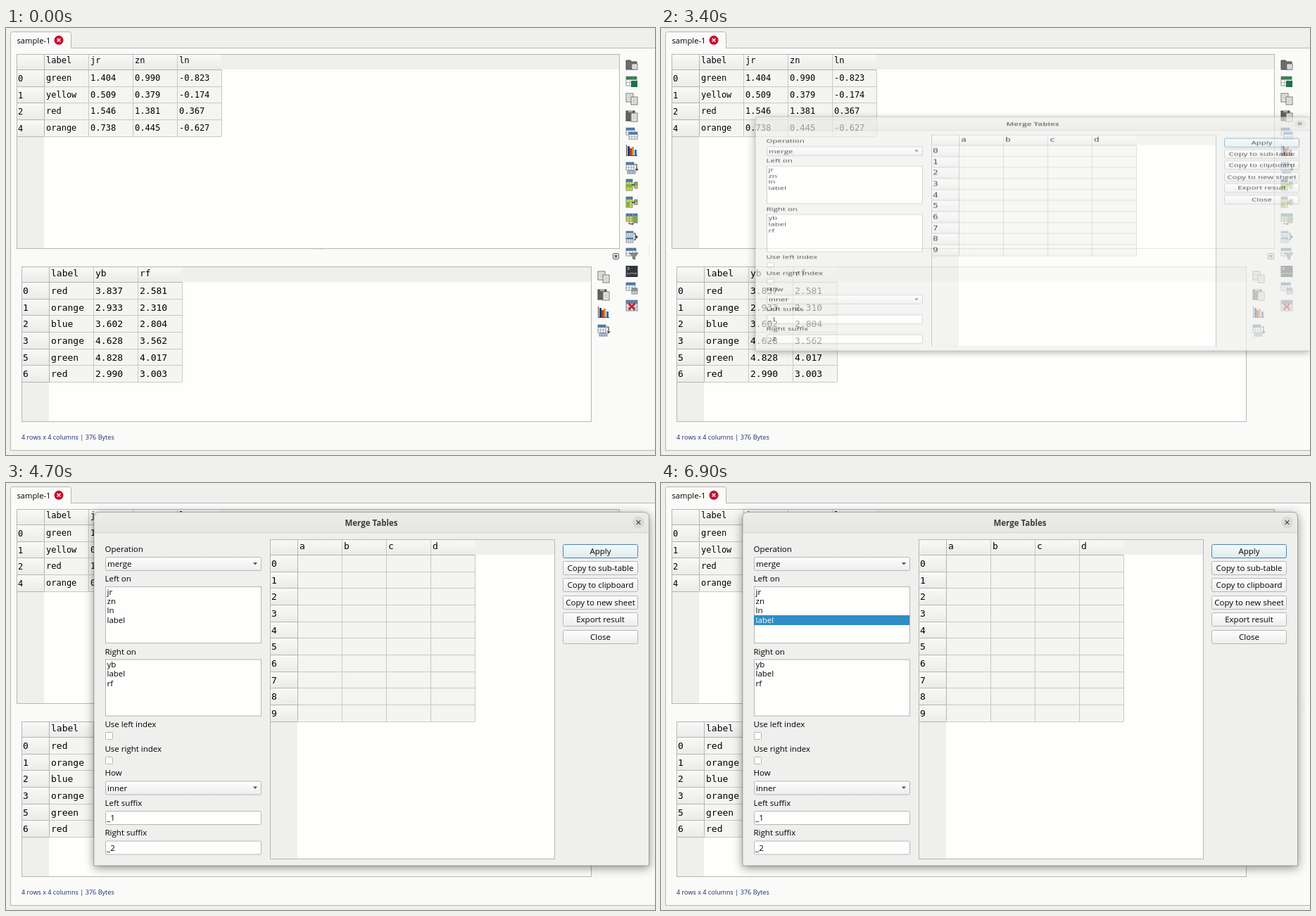
Write an HTML page that moves like this. It is 922 px wide and 607 px high and loops after 8 s.

```html
<!DOCTYPE html>
<html lang="en">
<head>
<meta charset="utf-8">
<title>Merge tables</title>
<style>
html, body { margin: 0; width: 100%; height: 100%; overflow: hidden; background: #efefee; }
svg { display: block; width: 922px; height: 607px; }
text { white-space: pre; }
.ui { font: 11.5px "Open Sans", "Noto Sans", sans-serif; }
.mono { font-family: "DejaVu Sans Mono", monospace; }
#dialog { transform-origin: 0 292.5px; }
#shade { filter: drop-shadow(0 3px 7px rgba(0, 0, 0, .45)); }
</style>
</head>
<body>
<script>
const LOOP = 8000;
const BLUE = '#2a78d0', GREEN = '#7cb82f', YELLOW = '#d8dc3c', EDGE = '#b6b6b4';

// --- drawing helpers -------------------------------------------------
const rect = (x, y, w, h, fill, extra = '') =>
  `<rect x="${x}" y="${y}" width="${w}" height="${h}" fill="${fill}" ${extra}/>`;
const box = (x, y, w, h, fill, stroke = EDGE, r = 0) =>
  rect(x + .5, y + .5, w - 1, h - 1, fill, `stroke="${stroke}" rx="${r}"`);
const path = (d, stroke, width = 1, fill = 'none') =>
  `<path d="${d}" fill="${fill}" stroke="${stroke}" stroke-width="${width}"/>`;
const ui = (x, y, s, extra = '') => `<text class="ui" x="${x}" y="${y}" ${extra}>${s}</text>`;
const mono = (x, y, s, size) => `<text class="mono" x="${x}" y="${y}" font-size="${size}">${s}</text>`;
const group = (id, body) => `<g id="${id}">${body}</g>`;
const cross = (x, y, r, color, w) =>
  path(`M${x - r} ${y - r}l${2 * r} ${2 * r}m0 ${-2 * r}l${-2 * r} ${2 * r}`, color, w);
const gradient = (id, a, b) =>
  `<linearGradient id="${id}" x2="0" y2="1"><stop stop-color="${a}"/><stop offset="1" stop-color="${b}"/></linearGradient>`;

function table(x, y, w, h, names, ids, rows, size, rowH) {
  const left = x + 39, top = y + 22, colW = 63;
  const right = left + colW * names.length, bottom = top + rowH * ids.length;
  const rowY = i => Math.round(top + rowH * i);
  let s = rect(x, y, w, h, '#fefefd') + rect(x, y, w, 22, '#efefee') + rect(x, y, 39, h, '#efefee');
  s += rect(x, y, right - x, 22, 'url(#head)');
  s += rect(left, top, right - left, bottom - top, '#f4f5f0');
  let grid = '', heads = `M${x} ${top + .5}H${right}M${left + .5} ${y}V${bottom}`;
  names.forEach((name, i) => {
    const cx = left + colW * i;
    grid += `M${cx + colW + .5} ${y + (i < names.length - 1 ? 1 : 22)}V${rowY(ids.length)}`;
    s += mono(cx + 3, y + size + 1, name, size);
  });
  ids.forEach((id, i) => {
    const ry = rowY(i), next = rowY(i + 1), base = ry + size / 2 + 10;
    s += rect(x, ry, 39, next - ry, 'url(#head)') + mono(x + 2, base + .5, id, size);
    heads += `M${x} ${next + .5}H${left}`;
    grid += `M${left} ${next + .5}H${right}`;
    (rows[i] || []).forEach((v, k) => { s += mono(left + 3 + colW * k, base, v, size); });
  });
  return s + path(grid, '#c8c9c5') + path(heads, '#b4b4b2') + box(x, y, w, h, 'none');
}

// --- toolbar icons, drawn around 0,0 ----------------------------------
function mini(x, y, w, h, head, body = '#fdfdfd', cols = 3, rows = 3) {
  let d = '';
  for (let i = 1; i < cols; i++) d += `M${x + w * i / cols} ${y}v${h}`;
  for (let i = 1; i < rows; i++) d += `M${x} ${y + h * i / rows}h${w}`;
  return rect(x, y, w, h, body) + rect(x, y, w, h / rows, head) +
    path(d, '#8b9299', .7) + rect(x, y, w, h, 'none', 'stroke="#6f767c" stroke-width=".8"');
}
const page = (x, y, w, h, fill = '#e6e6e2') =>
  rect(x, y, w, h, fill, 'stroke="#6c6c68" stroke-width=".9"') +
  path(`M${x + 2} ${y + 3}h${w - 4}m0 2.5h${4 - w}m0 2.5h${w - 4}`, '#b5b5b0', .8);
const arrow = (x, y) => path(`M${x} ${y}h5m-2 -2.5l2.5 2.5l-2.5 2.5`, '#333', 1.3);
const halves = (x, y, w, h) =>
  mini(x, y, w, h, GREEN, YELLOW, 2, 2);

const icons = {
  open: () => path('M-8 7V-6h6l2 2h7v11z', '#4d4d4a', 1, '#6d6d69') + page(0, -1, 8, 8),
  sheet: () => mini(-8, -7, 15, 13, '#2f7d45') + rect(-1, -1, 9, 9, '#1f7246'),
  copy: () => page(-8, -8, 10, 12) + page(-1, -3, 9, 11),
  paste: () => rect(-8, -7, 12, 14, '#66625b', 'stroke="#45423d"') + rect(-5, -8, 6, 3, '#aaa') + page(-1, -4, 9, 12),
  sub: () => mini(-8, -8, 12, 10, BLUE) + mini(-4, -2, 12, 10, BLUE),
  plot: () => path('M-7.5 -8V7.5H8', '#444', 1) + rect(-6, -6, 3, 13, '#1d3f73') + rect(-3, -3, 3, 10, '#b8392b') +
    rect(0, -5, 3, 12, '#d58c2a') + rect(4, -1, 3, 8, '#2a6db5'),
  transpose: () => mini(-8, -8, 11, 11, BLUE) + mini(-6, 4, 11, 4, '#a8c8ea', '#fff', 3, 1) +
    path('M4 -5h3v8m-2 -2l2 2.5l2 -2.5', '#333', 1.1),
  group: () => mini(-8, -8, 9, 16, BLUE, YELLOW, 2, 4) + rect(-8, -1, 9, 4, GREEN) + arrow(0, 0) + halves(4, -4, 4, 9),
  pivot: () => mini(-8, -8, 9, 15, BLUE, YELLOW, 2, 4) + rect(-7.5, 0, 4, 6.5, GREEN) + arrow(0, 0) + halves(4, -4, 4, 7),
  melt: () => mini(-8, -8, 9, 11, BLUE, YELLOW, 2, 3) + mini(2, -8, 6, 13, BLUE, GREEN, 2, 4) +
    path('M-4 4v2.5h6m-2 -2l2 2l-2 2', '#333', 1),
  merge: () => mini(-8, -8, 10, 7, BLUE) + mini(-8, 1, 10, 7, BLUE) +
    path('M3 -5h2v9h-2M5 0h3m-2 -2l2 2l-2 2', '#333', 1.1),
  filter: () => mini(-8, -8, 14, 11, BLUE) + path('M-3 -1H9L4.500 4V8L1.500 7V4z', '#4c4c4c', .8, '#8d8d8a'),
  python: () => rect(-8.5, -8, 17, 16, '#31363b') + path('M-6 -6l2.500 2l-2.500 2', '#fff', .9) +
    `<text class="mono" x="-7" y="4" font-size="4" fill="#d5d8da">python</text>`,
  copyTable: () => mini(-8, -8, 13, 11, BLUE) + mini(0, 0, 8, 8, '#8e9296', '#d2d4d4', 2, 2),
  clear: () => mini(-8, -8, 16, 15, '#607d9b', '#d9dde0') + cross(0, 1, 4.5, '#c01f2b', 2.8),
};
const bar = (x, y, names, step) =>
  names.map((n, i) => `<g transform="translate(${x} ${Math.round(y + i * step)})">${icons[n]()}</g>`).join('');

// --- main window ------------------------------------------------------
function mainWindow() {
  const dots = (x, y, dx, dy) => [0, 1, 2, 3, 4].map(i => rect(x + dx * i, y + dy * i, 1, 1, '#c4c4c2')).join('');
  return rect(0, 0, 922, 607, '#efefee') +
    box(6, 28, 930, 573, '#fafaf9') +
    path('M6.500 30V8.500q0 -3 3 -3H89.500q3 0 3 3V28.500', EDGE, 1, '#fafaf9') + rect(7, 27, 85, 3, '#fafaf9') +
    ui(15.5, 22, 'sample-1', 'style="font-size:11.200px"') +
    `<circle cx="75" cy="17.300" r="6.500" fill="#c8102e"/>` + cross(75, 17.3, 2.3, '#fff', 1.4) +
    table(15, 37, 857, 277, ['label', 'jr', 'zn', 'ln'], [0, 1, 2, 4], [
      ['green', '1.404', '0.990', '-0.823'], ['yellow', '0.509', '0.379', '-0.174'],
      ['red', '1.546', '1.381', '0.367'], ['orange', '0.738', '0.445', '-0.627']], 12, 23.65) +
    table(22, 339, 810, 221, ['label', 'yb', 'rf'], [0, 1, 2, 3, 5, 6], [
      ['red', '3.837', '2.581'], ['orange', '2.933', '2.310'], ['blue', '3.602', '2.804'],
      ['orange', '4.628', '3.562'], ['green', '4.828', '4.017'], ['red', '2.990', '3.003']], 13, 23.65) +
    group('focus', box(54, 59, 64, 24, '#dfe9eb', '#9bb7c4') + mono(57, 75, 'green', 12)) +
    dots(437, 314, 3, 0) + dots(913, 309, 0, 3) +
    box(862, 320, 9, 9, '#fff', '#555', 1) + cross(866.5, 324.5, 2, '#333', 1.1) +
    group('hover', box(877, 309, 25, 24, '#fdfdfc', '#b0b0ae', 2)) +
    bar(889, 51.5, Object.keys(icons).flatMap(k => k), 24.5) +
    bar(849, 354, ['copy', 'paste', 'plot', 'transpose'], 25.2) +
    ui(22, 584.5, '4 rows x 4 columns | 376 Bytes', 'fill="#1c2c6c" style="font-size:9.100px"') +
    group('tip', box(881, 301, 60, 52, '#ffffdc', '#555') + ui(886, 331, 'merge'));
}

// --- dialog -----------------------------------------------------------
const field = (y, s) => box(150, y, 222, 20, '#fefefd', EDGE, 2) + ui(152, y + 14, s);
const combo = (y, s, id) => box(150, y, 222, 20, 'url(#button)', EDGE, 2) +
  ui(153, y + 14, s, `id="${id}"`) + path(`M360 ${y + 8}h6l-3 3.500z`, 'none', 0, '#555');
const list = (y, items) => box(150, y, 222, 81, '#fefefd') +
  items.map((s, i) => ui(152.5, y + 11.5 + 13.4 * i, s)).join('');
const check = y => box(150, y, 11, 11, '#fefefd', EDGE, 1);

function dialog() {
  const labels = [[97.5, 'Operation'], [140, 'Left on'], [243.5, 'Right on'], [347, 'Use left index'],
    [381.5, 'Use right index'], [416, 'How'], [458.5, 'Left suffix'], [501, 'Right suffix']];
  const buttons = ['Apply', 'Copy to sub-table', 'Copy to clipboard', 'Copy to new sheet', 'Export result', 'Close'];
  const outline = 'M134 544V49q0 -7.500 7.500 -7.500H915q7.500 0 7.500 7.500V544z';
  return `<path id="shade" d="${outline}" fill="#efefee"/>` +
    path('M134 70V49q0 -7.500 7.500 -7.500H915q7.500 0 7.500 7.500V70z', 'none', 0, 'url(#title)') +
    path('M134 70.500H922.500', '#d3d3d0') + path(outline, 'rgba(0,0,0,.28)') +
    ui(528, 60.5, 'Merge Tables', 'text-anchor="middle" fill="#3d3d3d" style="font-weight:700"') +
    `<circle cx="907.500" cy="56" r="8.500" fill="#dadad7"/>` + cross(907.5, 56, 2.8, '#3d3d3d', 1.2) +
    labels.map(([y, s]) => ui(149.5, y, s)).join('') +
    combo(105, 'merge', 'op') + list(147, ['jr', 'zn', 'ln', 'label']) +
    group('pick', rect(150, 188, 221, 14, '#308cc6') + ui(152.5, 198.7, 'label', 'fill="#fff"')) +
    list(250.5, ['yb', 'label', 'rf']) + check(354) + check(389) +
    combo(423.5, 'inner', 'how') + field(466, '_1') + field(508.5, '_2') +
    table(384, 80, 405, 455, ['a', 'b', 'c', 'd'], [...Array(10).keys()], [], 13, 23.65) +
    buttons.map((s, i) => {
      const y = Math.round(86.5 + 24.4 * i);
      return box(800, y, 107, 20, i ? 'url(#button)' : 'url(#apply)', i ? EDGE : '#4b83a8', 2) +
        ui(853.5, y + 14, s, 'text-anchor="middle"');
    }).join('');
}

document.body.innerHTML = `<svg viewBox="0 0 922 607"><defs>` +
  gradient('head', '#f9f9f8', '#ebebea') + gradient('button', '#fefefe', '#ededec') +
  gradient('apply', '#f5fafb', '#dcebef') + gradient('title', '#ececea', '#e6e6e3') +
  `</defs>${mainWindow()}${group('dialog', dialog())}</svg>`;

// --- timeline: [ms, value] steps ---------------------------------------
function steps(id, prop, list) {
  const keys = list.map(([ms, v]) => ({ offset: ms / LOOP, [prop]: v, easing: 'steps(1, end)' }));
  keys.push({ offset: 1, [prop]: list[list.length - 1][1] });
  document.getElementById(id).animate(keys, { duration: LOOP, iterations: Infinity });
}
const show = (id, from, to) =>
  steps(id, 'opacity', [[0, 0], [from, 1], ...(to ? [[to, 0]] : [])]);
const pose = (x, sy = 1) => `translateX(${x}px) scaleY(${sy})`;

show('focus', 600, 3300);
show('hover', 1900, 3300);
steps('hover', 'transform', [[0, 'translateY(0px)'], [2100, 'translateY(-25px)']]);
show('tip', 2900, 3300);
steps('dialog', 'opacity', [[0, 0], [3400, .68], [3500, 1]]);
steps('dialog', 'transform', [[0, pose(0, .662)], [3500, pose(0)],
  [4600, pose(-4)], [4700, pose(-9)], [4800, pose(-14)], [4900, pose(-18)]]);
steps('op', 'fill', [[0, '#000'], [5600, '#1c1c1c'], [5800, '#000']]);
show('pick', 6900);
</script>
</body>
</html>
```
